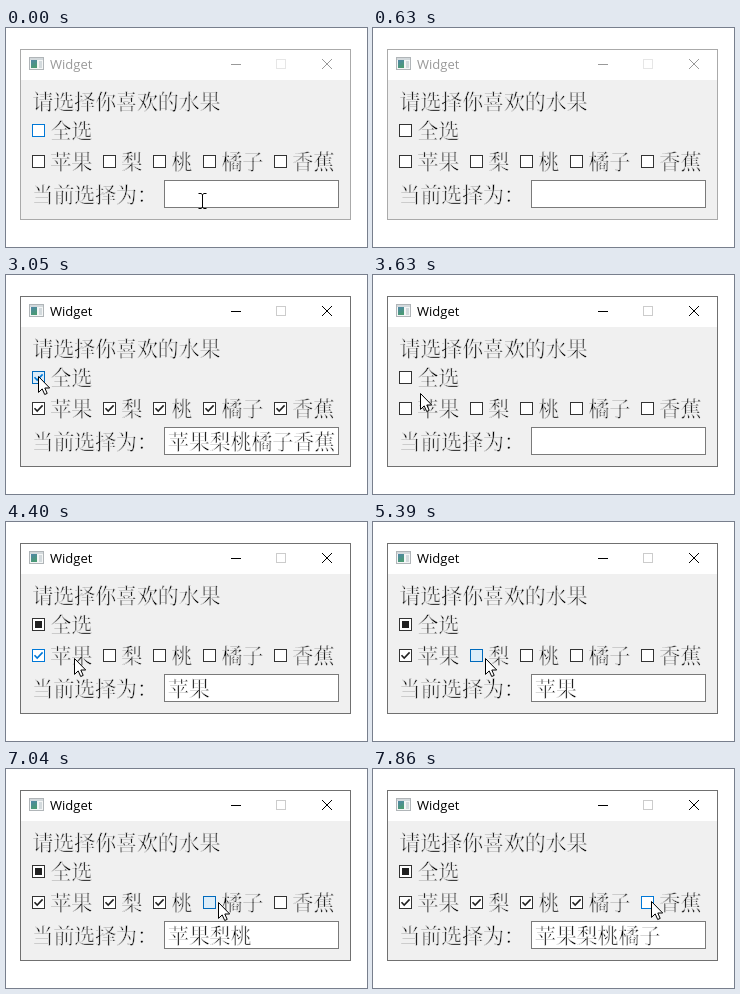
Animation, 361 px wide and 219 px high, one loop 8 s. Source, as an HTML page:

```html
<!DOCTYPE html>
<html lang="zh-CN">
<head>
<meta charset="utf-8">
<title>Widget</title>
<style>
  html, body { margin: 0; width: 100%; height: 100%; overflow: hidden; background: #fff; }
  svg { display: block; }
  /* The outline in the background colour thins the strokes of the glyphs */
  .cjk {
    font: 300 20.9px "Noto Serif CJK SC", "Noto Sans CJK SC", "Noto Sans CJK", serif;
    fill: #000; stroke: #f0f0f0; stroke-width: 0.5;
  }
  #result { stroke: #fff; }
  .title { font: 13px "Open Sans", "Noto Sans", sans-serif; }
  .line { fill: none; stroke-width: 1; }
</style>
</head>
<body>
<svg width="361" height="219" viewBox="0 0 361 219">
  <defs>
    <linearGradient id="pane" x2="0.4" y2="1">
      <stop offset="0" stop-color="#4f86a8"/>
      <stop offset="1" stop-color="#4a9a74"/>
    </linearGradient>
  </defs>
  <rect width="361" height="219" fill="#fff"/>
  <rect x="15" y="52" width="329" height="139" fill="#f0f0f0"/>
  <rect id="frame" class="line" x="14.5" y="21.5" width="330" height="170"/>
  <g>
    <rect x="23.5" y="29.5" width="14" height="12" fill="#f4f6f6" stroke="#b0b5b8"/>
    <rect x="24" y="30" width="13" height="2" fill="#d3d9dc"/>
    <rect x="25" y="32" width="6" height="8" fill="url(#pane)"/>
    <rect x="33" y="33" width="3" height="7" fill="#d3dadd"/>
  </g>
  <text id="caption" class="title" x="44" y="41">Widget</text>
  <path id="buttons" class="line" d="M225 36.5h10M316 31l10 10M326 31l-10 10"/>
  <rect id="maximize" class="line" x="270.5" y="31.5" width="9" height="9"/>
  <text class="cjk" x="26.5" y="80.5">请选择你喜欢的水果</text>
  <text class="cjk" x="26.5" y="174">当前选择为：</text>
  <rect id="edit" x="158.5" y="152.5" width="174" height="27" fill="#fff"/>
  <text id="result" class="cjk" x="162" y="173.5"></text>
  <g id="boxes"></g>
  <path id="arrow" d="M.5.5V16.4L4.2 12.9 6.7 18.5 9.2 17.4 6.8 12H11.7Z" fill="#fff" stroke="#000"/>
  <path id="beam" class="line" stroke="#000" d="M-3.5-7.5H-1L.5-6.5 2-7.5H4.5M.5-6.5V6.5M-3.5 7.5H-1L.5 6.5 2 7.5H4.5"/>
</svg>
<script>
const LOOP = 8000, STEP = 140;
const GONE = 630, BACK = 1090;
const $ = id => document.getElementById(id);

// The pointer rests between glides
const home = { x: 196, y: 173 };
const glides = [
  { start: 150, end: GONE, x: 203, y: 200 },
  { start: BACK, end: 1640, x: 37, y: 105 },
  { start: 2340, end: 2910, x: 32, y: 101 },
  { start: 3330, end: 3930, x: 57, y: 129 },
  { start: 4400, end: 4400, x: 68, y: 136 },
  { start: 4950, end: 5230, x: 112, y: 136 },
  { start: 5510, end: 5920, x: 174, y: 135 },
  { start: 6340, end: 6760, x: 212, y: 133 },
  { start: 7180, end: 7860, x: 278, y: 132 }
];

// Each click is pressed for one step before its release
const clicks = [
  { box: 0, release: 2340 }, { box: 0, release: 3190 }, { box: 1, release: 4100 },
  { box: 2, release: 5500 }, { box: 3, release: 6340 }, { box: 4, release: 7180 }
];

const boxes = [makeBox("全选", 26, 96)];
let left = 26;
for (const label of ["苹果", "梨", "桃", "橘子", "香蕉"]) {
  const box = makeBox(label, left, 127);
  boxes.push(box);
  left = box.right + 10;
}

function makeBox(label, x, y) {
  const g = add($("boxes"), "g", { transform: `translate(${x} ${y})` });
  const rect = add(g, "rect", { x: 0.5, y: 0.5, width: 12, height: 12 });
  const tick = add(g, "path", { d: "M2.5 6.2L5.2 9 10.6 3.4", class: "line", style: "stroke-width: 1.6" });
  const dot = add(g, "rect", { x: 3, y: 3, width: 7, height: 7, fill: "#212121" });
  add(g, "text", { x: 18.5, y: 14, class: "cjk" }).textContent = label;
  return { label, x, y, rect, tick, dot, right: x + 19 + label.length * 21 };
}

function add(parent, tag, attrs) {
  const el = document.createElementNS("http://www.w3.org/2000/svg", tag);
  set(el, attrs);
  return parent.appendChild(el);
}

function set(el, attrs) {
  for (const name in attrs) el.setAttribute(name, attrs[name]);
}

function show(el, on) {
  el.style.display = on ? "" : "none";
}

function pointerAt(t) {
  let from = home;
  for (const to of glides) {
    if (t < to.start) break;
    if (t < to.end) {
      const gaps = Math.round((to.end - to.start) / STEP);
      const done = Math.floor((t - to.start) / (to.end - to.start) * gaps) + 1;
      const k = done / (gaps + 1);
      return {
        x: Math.round(from.x + (to.x - from.x) * k),
        y: Math.round(from.y + (to.y - from.y) * k)
      };
    }
    from = to;
  }
  return from;
}

function checksAt(t) {
  const on = boxes.map(() => false);
  for (const { box, release } of clicks) {
    if (t < release) break;
    if (box) on[box] = !on[box];
    else on.fill(!on[1]);
  }
  return on;
}

function draw(t) {
  const { x, y } = pointerAt(t);
  const visible = t < GONE || t >= BACK;
  const moved = t >= glides[0].start;
  const active = t >= clicks[0].release - STEP;
  const inEdit = x > 158 && x < 333 && y > 152 && y < 180;

  $("frame").setAttribute("stroke", active ? "#707070" : "#aaa");
  $("caption").setAttribute("fill", active ? "#000" : "#999");
  $("buttons").setAttribute("stroke", active ? "#000" : "#999");
  $("maximize").setAttribute("stroke", active ? "#ccc" : "#e6e6e6");
  $("edit").setAttribute("stroke", inEdit && moved ? "#484848" : "#7a7a7a");

  const on = checksAt(t);
  const chosen = boxes.filter((b, i) => i && on[i]);
  const all = chosen.length === boxes.length - 1;
  $("result").textContent = chosen.map(b => b.label).join("");

  boxes.forEach((b, i) => {
    const over = visible && x >= b.x && x < b.right && y >= b.y - 3 && y < b.y + 19;
    const hover = over || (!i && !moved);
    const pressed = clicks.some(c => c.box === i && t >= c.release - STEP && t < c.release);
    set(b.rect, {
      fill: pressed ? "#dcedf9" : "#fff",
      stroke: pressed ? "#006abc" : hover ? "#0078d7" : "#333"
    });
    b.tick.setAttribute("stroke", hover ? "#0078d7" : "#212121");
    show(b.tick, i ? on[i] : all);
    show(b.dot, !i && chosen.length && !all);
  });

  const place = `translate(${x} ${y})`;
  set($("arrow"), { transform: place });
  set($("beam"), { transform: place });
  show($("arrow"), visible && !inEdit);
  show($("beam"), visible && inEdit);
}

const began = performance.now();
function tick() {
  draw((performance.now() - began) % LOOP);
  requestAnimationFrame(tick);
}
draw(0);
requestAnimationFrame(tick);
</script>
</body>
</html>
```
